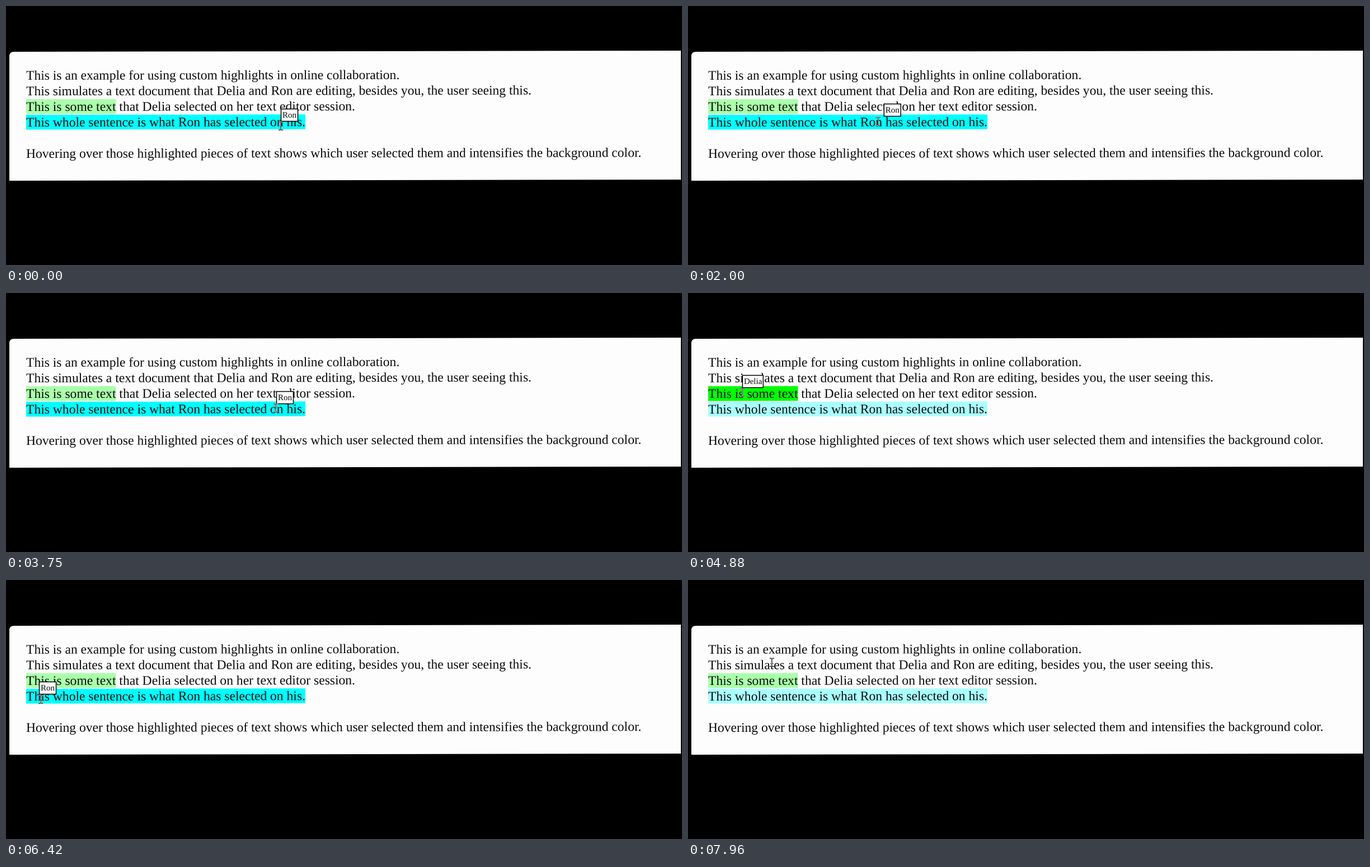
Animation of 1208 by 464 pixels, one loop 8000 ms. Source, as an HTML page:

```html
<!DOCTYPE html>
<html lang="en">
<head>
<meta charset="utf-8">
<title>Collaborative highlights</title>
<style>
  html, body { margin: 0; width: 100%; height: 100%; overflow: hidden; background: #000; }
  svg { display: block; isolation: isolate; }
  text { font: 23.58px "Liberation Serif", "Times New Roman", serif; fill: #0c0c0c; text-rendering: geometricPrecision; }
  #tip text { font-size: 15px; }
  #cursor { fill: none; stroke: #ccc; stroke-width: 1.5; mix-blend-mode: difference; }
</style>
</head>
<body>
<svg width="1208" height="464" viewBox="0 0 1208 464">
  <rect width="1208" height="464"/>
  <path d="M6 90Q6 82 14 82L1206 80V311L6 313Z" fill="#fdfdfd"/>
  <g transform="matrix(1 -.0016 0 1 0 .06)">
    <rect id="green" x="36" y="167" width="160.5" height="26.4"/>
    <rect id="cyan" x="36" y="195" width="499" height="26.4"/>
    <text x="36" y="132">This is an example for using custom highlights in online collaboration.</text>
    <text x="36" y="160">This simulates a text document that Delia and Ron are editing, besides you, the user seeing this.</text>
    <text x="36" y="188">This is some text that Delia selected on her text editor session.</text>
    <text x="36" y="216">This whole sentence is what Ron has selected on his.</text>
    <text x="36" y="272">Hovering over those highlighted pieces of text shows which user selected them and intensifies the background color.</text>
  </g>
  <g id="tip">
    <rect x=".5" y=".5" height="22" fill="#fdfdfd" stroke="#000" stroke-width="1.5"/>
    <text x="3" y="15.7"></text>
  </g>
  <path id="cursor" d="M-4 -7.3H-1.5L0 -6L1.5 -7.3H4M0 -6V6M-4 7.3H-1.5L0 6L1.5 7.3H4"/>
</svg>
<script>
const LOOP = 8000, LAG = 40;
const $ = id => document.getElementById(id);
const tipBox = document.querySelector('#tip rect');
const tipText = document.querySelector('#tip text');

// Pointer path: time, x, y
const path = [
  [0, 491, 215], [400, 485, 209], [840, 476, 222.5], [880, 477, 226],
  [1020, 470, 235], [1200, 452, 227], [1350, 440, 214], [1700, 405, 205],
  [1960, 350, 206], [2000, 340, 207], [2250, 230, 205], [2430, 120, 190],
  [2500, 100, 179], [2700, 88, 178], [2900, 130, 186], [3100, 240, 208],
  [3400, 430, 211], [3600, 484, 208], [3710, 483, 207], [3750, 482, 206],
  [3900, 515, 204], [4060, 580, 172], [4170, 480, 151], [4500, 240, 156],
  [4700, 120, 171], [4840, 97, 178], [4880, 97, 178], [5100, 70, 172],
  [5300, 20, 150], [5450, 12, 165], [5650, 40, 196], [5830, 62, 208],
  [6100, 48, 212], [6380, 59, 213], [6420, 62, 214], [6700, 120, 208],
  [7000, 230, 210], [7250, 290, 206], [7450, 275, 190], [7540, 258, 190],
  [7700, 215, 168], [7850, 150, 148], [8000, 152, 148]
];

const slope = (i, k) => {
  const a = path[Math.max(i - 1, 0)], b = path[Math.min(i + 1, path.length - 1)];
  return (b[k] - a[k]) / (b[0] - a[0]);
};

function pointer(t) {
  t = Math.max(t, 0);
  const i = path.findIndex(p => p[0] > t) - 1;
  const a = path[i], b = path[i + 1], d = b[0] - a[0], u = (t - a[0]) / d, v = 1 - u;
  // cubic Hermite between neighbouring points
  return [1, 2].map(k =>
    a[k] * (1 + 2 * u) * v * v + b[k] * u * u * (3 - 2 * u) +
    d * u * v * (slope(i, k) * v - slope(i + 1, k) * u));
}

const place = (el, x, y) => el.setAttribute('transform', `translate(${x} ${y})`);

function draw(now) {
  const t = now % LOOP;
  place($('cursor'), ...pointer(t));

  // The page reacts slightly after the pointer
  const [x, y] = pointer(t - LAG);
  const onGreen = x > 36 && x < 197 && y > 166 && y < 194;
  const onCyan = x > 36 && x < 535 && y >= 194 && y < 223;
  $('green').setAttribute('fill', onGreen ? '#0f0' : '#afa');
  $('cyan').setAttribute('fill', onCyan ? '#0ff' : '#aff');

  $('tip').style.display = onGreen || onCyan ? '' : 'none';
  place($('tip'), x, y - 31);
  tipText.textContent = onGreen ? 'Delia' : 'Ron';
  tipBox.setAttribute('width', onGreen ? 37 : 30);
  requestAnimationFrame(loop);
}

const start = performance.now();
const loop = () => draw(performance.now() - start);
draw(0);
</script>
</body>
</html>
```
